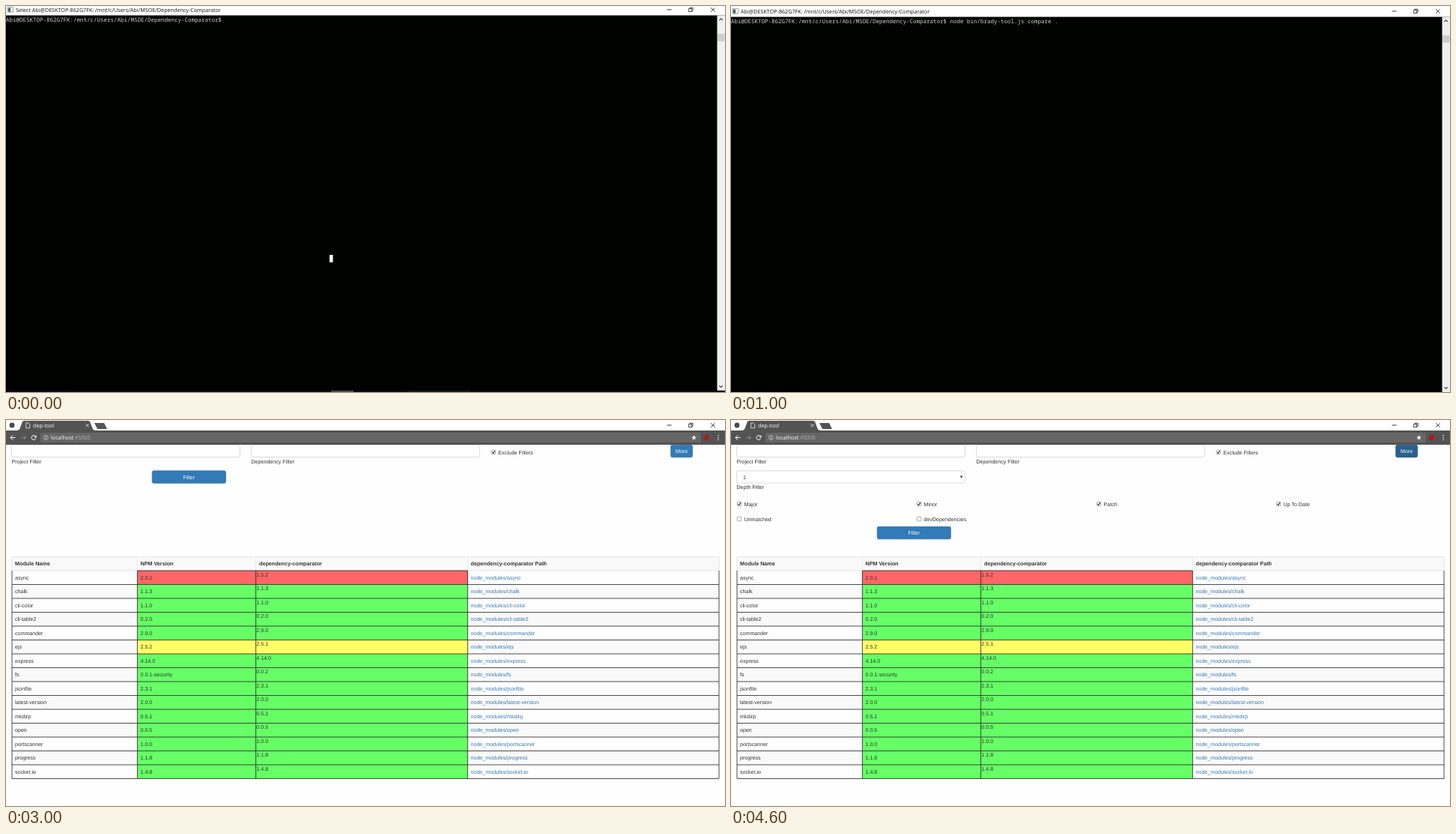
These frames come from a looping animation (960x515 px, 5 s). An HTML page with a canvas:

```html
<!DOCTYPE html>
<html lang="en">
<head>
<meta charset="utf-8">
<title>dep-tool</title>
<style>
html, body { margin: 0; width: 100%; height: 100%; overflow: hidden; background: #fff; }
canvas { display: block; width: 960px; height: 515px; }
</style>
</head>
<body>
<canvas id="stage"></canvas>
<script>
const W = 960, H = 515, STEP = 1000, SCENES = 5;
const CELL = 4.5, ROW = 10;
const MONO = '7.5px "Noto Sans Mono", "DejaVu Sans Mono", monospace';
const TITLE = '7.2px "Open Sans", "Noto Sans", sans-serif';
const PAGE = '7.1px "Liberation Sans", Arial, sans-serif';
const BOLD = 'bold 7.2px "Liberation Sans", Arial, sans-serif';

const path = '/mnt/c/Users/Abi/MSOE/Dependency-Comparator';
const host = 'Abi@DESKTOP-862G7FK';
const prompt = host + ':' + path + '$';
const command = ' node bin/brady-tool.js compare .';

// name, registry version, local version, level
const modules = [
  ['async', '2.0.1', '1.5.2', 'major'],
  ['chalk', '1.1.3', '1.1.3'],
  ['cli-color', '1.1.0', '1.1.0'],
  ['cli-table2', '0.2.0', '0.2.0'],
  ['commander', '2.9.0', '2.9.0'],
  ['ejs', '2.5.2', '2.5.1', 'patch'],
  ['express', '4.14.0', '4.14.0'],
  ['fs', '0.0.1-security', '0.0.2'],
  ['jsonfile', '2.3.1', '2.3.1'],
  ['latest-version', '2.0.0', '2.0.0'],
  ['mkdirp', '0.5.1', '0.5.1'],
  ['open', '0.0.5', '0.0.5'],
  ['portscanner', '1.0.0', '1.0.0'],
  ['progress', '1.1.8', '1.1.8'],
  ['socket.io', '1.4.8', '1.4.8'],
  ['text-table', '0.2.0', '0.2.0']
];
const heads = ['Module Name', 'NPM Version', 'dependency-comparator', 'dependency-comparator Path'];
const termInk = { major: '#e00010', patch: '#ffff20', same: '#00ff00' };
const cellFill = { major: '#ff6666', patch: '#ffff66', same: '#66ff66' };

const canvas = document.getElementById('stage');
const ctx = canvas.getContext('2d');
const dpr = window.devicePixelRatio || 1;
canvas.width = W * dpr;
canvas.height = H * dpr;
ctx.scale(dpr, dpr);
ctx.textRendering = 'geometricPrecision';

function rect(x, y, w, h, fill) {
  ctx.fillStyle = fill;
  ctx.fillRect(x, y, w, h);
}

function text(str, x, y, font, fill, align = 'left') {
  ctx.font = font;
  ctx.fillStyle = fill;
  ctx.textAlign = align;
  ctx.fillText(str, x, y);
}

// Text centred vertically on y
const label = (str, x, y, fill = '#333', font = PAGE, align) =>
  text(str, x, y + 2.5, font, fill, align);

function line(points, color, width = 1) {
  ctx.beginPath();
  points.forEach(([x, y], i) => i ? ctx.lineTo(x, y) : ctx.moveTo(x, y));
  ctx.strokeStyle = color;
  ctx.lineWidth = width;
  ctx.stroke();
}

function poly(points, fill) {
  ctx.beginPath();
  points.forEach(([x, y]) => ctx.lineTo(x, y));
  ctx.fillStyle = fill;
  ctx.fill();
}

function dot(x, y, r, fill) {
  ctx.beginPath();
  ctx.arc(x, y, r, 0, Math.PI * 2);
  ctx.fillStyle = fill;
  ctx.fill();
}

function box(x, y, w, h, r, fill, stroke) {
  ctx.beginPath();
  ctx.roundRect(x, y, w, h, r);
  ctx.fillStyle = fill;
  ctx.fill();
  if (!stroke) return;
  ctx.strokeStyle = stroke;
  ctx.lineWidth = 0.7;
  ctx.stroke();
}

function cross(x, y, r, color, width) {
  line([[x - r, y - r], [x + r, y + r]], color, width);
  line([[x - r, y + r], [x + r, y - r]], color, width);
}

function windowButtons(y) {
  rect(882.5, y - 0.5, 6, 0.9, '#222');
  ctx.strokeStyle = '#222';
  ctx.lineWidth = 0.8;
  ctx.strokeRect(911.7, y - 1.4, 4, 4);
  line([[913, y - 1.6], [913, y - 2.8], [917.1, y - 2.8], [917.1, y + 1.2], [916, y + 1.2]], '#222', 0.8);
  cross(943.8, y, 2.7, '#222', 0.9);
}

// Terminal

const put = (str, col, row, fill = '#d2d2d2') =>
  text(str, col * CELL, 22.5 + row * ROW, MONO, fill);

function terminal(title, shift) {
  const bar = 14.5, edge = 949.5;
  rect(0, 0, W, H, '#000200');
  ctx.save();
  ctx.translate(0, shift);
  rect(0, -shift, W, bar + shift, '#fff');
  box(2, 3.3, 8, 7, 0.5, '#e8ecec', '#8a9090');
  rect(2.8, 4.6, 3.2, 5, '#3c6464');
  text(title, 13, 9.7, TITLE, '#111');
  windowButtons(7);
  rect(edge, bar, W - edge, H, '#f0f0f0');
  line([[952.3, 21.2], [954.6, 18.9], [956.9, 21.2]], '#444', 1.1);
  line([[952.3, 508.4], [954.6, 510.7], [956.9, 508.4]], '#444', 1.1);
  rect(950, 39, 9.5, 10, '#cdcdcd');
  put(prompt, 0, 0);
  ctx.restore();
}

function selecting() {
  terminal('Select ' + host + ': ' + path, -2);
  rect(432, 332, 4.5, 10, '#fff');
  rect(0, 513, W, 2, '#0a0c18');
  rect(434, 513, 30, 2, '#4a4a4a');
  rect(536, 513, 84, 2, '#0e1c1e');
}

function running() {
  terminal(host + ': ' + path, 0);
  put(command, prompt.length, 0);
}

function report() {
  running();
  const cols = [2, 19, 36, 60];
  for (let i = 0; i <= 17; i++) rect(2, 29.5 + i * 20, 396.7, 0.8, '#8c8c8c');
  for (const c of [0, 17, 34, 58, 88]) rect(c * CELL + 1.8, 29.5, 0.8, 340.8, '#8c8c8c');
  heads.forEach((h, i) => put(h, cols[i], 2));
  modules.forEach(([name, npm, own, level = 'same'], i) => {
    const row = 4 + i * 2;
    put(name, cols[0], row);
    put(npm, cols[1], row, termInk[level]);
    put(own, cols[2], row, termInk[level]);
    put('node_modules/' + name, cols[3], row);
  });
  put('dependency-comparator', 11, 36);
  [['major', 1], ['minor', 0], ['patch', 1], ['unmatched', 16]].forEach(([key, n], i) => {
    put(key, 0, 37 + i);
    put(String(n), 11, 37 + i);
  });
  put('Listening on localhost:45000', 0, 41);
  rect(0, 442, 4.5, 2.3, '#fff');
}

// Browser

function chrome() {
  rect(0, 0, W, 14, '#fff');
  dot(8, 7, 3.4, '#4a4a4a');
  poly([[15, 14], [18, 12.5], [22, 2], [24, 1], [110, 1], [112, 2], [116, 12.5], [119, 14]], '#535353');
  poly([[118, 4], [131, 4], [135, 12], [122, 12]], '#555');
  line([[26.7, 3.8], [30, 3.8], [31.7, 5.5], [31.7, 10.8], [26.7, 10.8], [26.7, 3.8]], '#f0f0f0', 0.8);
  text('dep-tool', 36, 9.7, TITLE, '#fff');
  cross(108.5, 7.3, 1.9, '#e8e8e8', 0.9);
  windowButtons(7);

  rect(0, 14, W, 19, '#535353');
  box(46, 17, 882, 13, 1.5, '#666');
  line([[12.5, 23.5], [6, 23.5]], '#fff', 1);
  line([[9, 20.4], [5.9, 23.5], [9, 26.6]], '#fff', 1);
  line([[20, 23.5], [26.5, 23.5]], '#8c8c8c', 1);
  line([[23.5, 20.4], [26.6, 23.5], [23.5, 26.6]], '#8c8c8c', 1);
  ctx.beginPath();
  ctx.arc(37, 23.5, 2.9, 0.3, 5.5);
  ctx.strokeStyle = '#fff';
  ctx.lineWidth = 1;
  ctx.stroke();
  poly([[40.6, 20], [40.6, 23.2], [37.4, 23.2]], '#fff');

  ctx.beginPath();
  ctx.arc(53.3, 23.5, 2.9, 0, Math.PI * 2);
  ctx.lineWidth = 0.7;
  ctx.strokeStyle = '#ddd';
  ctx.stroke();
  rect(52.9, 23, 0.8, 2.3, '#ddd');
  rect(52.9, 21.6, 0.8, 0.8, '#ddd');
  text('localhost', 60, 26, TITLE, '#fff');
  text(':45000', 60 + ctx.measureText('localhost').width, 26, TITLE, '#b0b0b0');

  const star = Array.from({ length: 10 }, (_, i) => {
    const r = i % 2 ? 1.5 : 3.5, a = i * Math.PI / 5 - Math.PI / 2;
    return [918.5 + r * Math.cos(a), 23.6 + r * Math.sin(a)];
  });
  poly(star, '#fff');
  dot(935.3, 23.4, 3.3, '#b8141c');
  for (const y of [20.6, 23.4, 26.2]) dot(951, y, 0.75, '#fff');
}

function check(str, x, y, on) {
  box(x + 0.4, y - 2.7, 5.4, 5.4, 0.8, '#fff', '#8a8a8a');
  if (on) line([[x + 1.5, y], [x + 2.7, y + 1.4], [x + 4.9, y - 1.7]], '#222', 1.1);
  label(str, x + 9.5, y);
}

function button(str, x, y, w, h, down) {
  box(x, y, w, h, 2, down ? '#286090' : '#337ab7', down ? '#204d74' : '#2e6da4');
  label(str, x + w / 2, y + h / 2, '#fff', PAGE, 'center');
}

const field = (x, y) => box(x, y, 304.7, 16.2, 2, '#fff', '#ccc');

function grid() {
  const top = 201, pitch = 18.5, rows = modules.slice(0, 15);
  const bottom = top + pitch * rows.length;
  const edges = [175.3, 333.7, 616.3];
  rect(8, 182.5, 944, 18.5, '#f9f9f9');
  ctx.strokeStyle = '#ddd';
  ctx.lineWidth = 0.7;
  ctx.strokeRect(8, 182.3, 944, 18.7);
  for (const x of edges) rect(x - 0.3, 182.5, 0.6, 18.5, '#e2e2e2');
  [12, 179.5, 338, 620.5].forEach((x, i) => label(heads[i], x, 191.5, '#333', BOLD));

  rows.forEach(([name, npm, own, level = 'same'], i) => {
    const y = top + i * pitch, mid = y + 9.2;
    if (i % 2) rect(8, y, 944, pitch, '#f9f9f9');
    rect(edges[0], y, edges[2] - edges[0], pitch, cellFill[level]);
    label(name, 12, mid);
    label(npm, 179.5, mid);
    label(own, 334.3, mid - 4);
    label('node_modules/' + name, 620.5, mid, '#337ab7');
  });
  for (let i = 1; i <= rows.length; i++) rect(8, top + i * pitch - 0.4, 944, 0.8, '#222');
  rect(edges[0], top - 0.4, edges[2] - edges[0], 0.8, '#222');
  for (const x of [8, ...edges, 952]) rect(x - 0.4, top, 0.8, bottom - top, '#222');
}

function page(open) {
  rect(0, 0, W, H, '#fefefe');
  field(7.6, 33.2);
  field(327.6, 33.2);
  label('Project Filter', 7.5, 55);
  label('Dependency Filter', 327.5, 55);
  check('Exclude Filters', 647.8, 43, true);
  button('More', 887.7, 33.2, 28.8, 16.5, open);
  if (open) {
    field(7.6, 67.8);
    label('1', 16, 76);
    poly([[305.8, 74.6], [309.4, 74.6], [307.6, 77.8]], '#333');
    label('Depth Filter', 7.5, 89.5);
    ['Major', 'Minor', 'Patch', 'Up To Date'].forEach((s, i) => check(s, 8 + i * 240, 112, true));
    ['Unmatched', 'devDependencies'].forEach((s, i) => check(s, 8 + i * 240, 132, false));
  }
  button('Filter', 195.2, open ? 142.3 : 67.8, 98.2, 16.5);
  grid();
  chrome();
}

const scenes = [selecting, running, report, () => page(false), () => page(true)];
const start = performance.now();
let shown = -1;

function tick() {
  const now = Math.floor((performance.now() - start) / STEP) % SCENES;
  if (now !== shown) {
    shown = now;
    scenes[now]();
  }
  requestAnimationFrame(tick);
}
tick();
</script>
</body>
</html>
```
